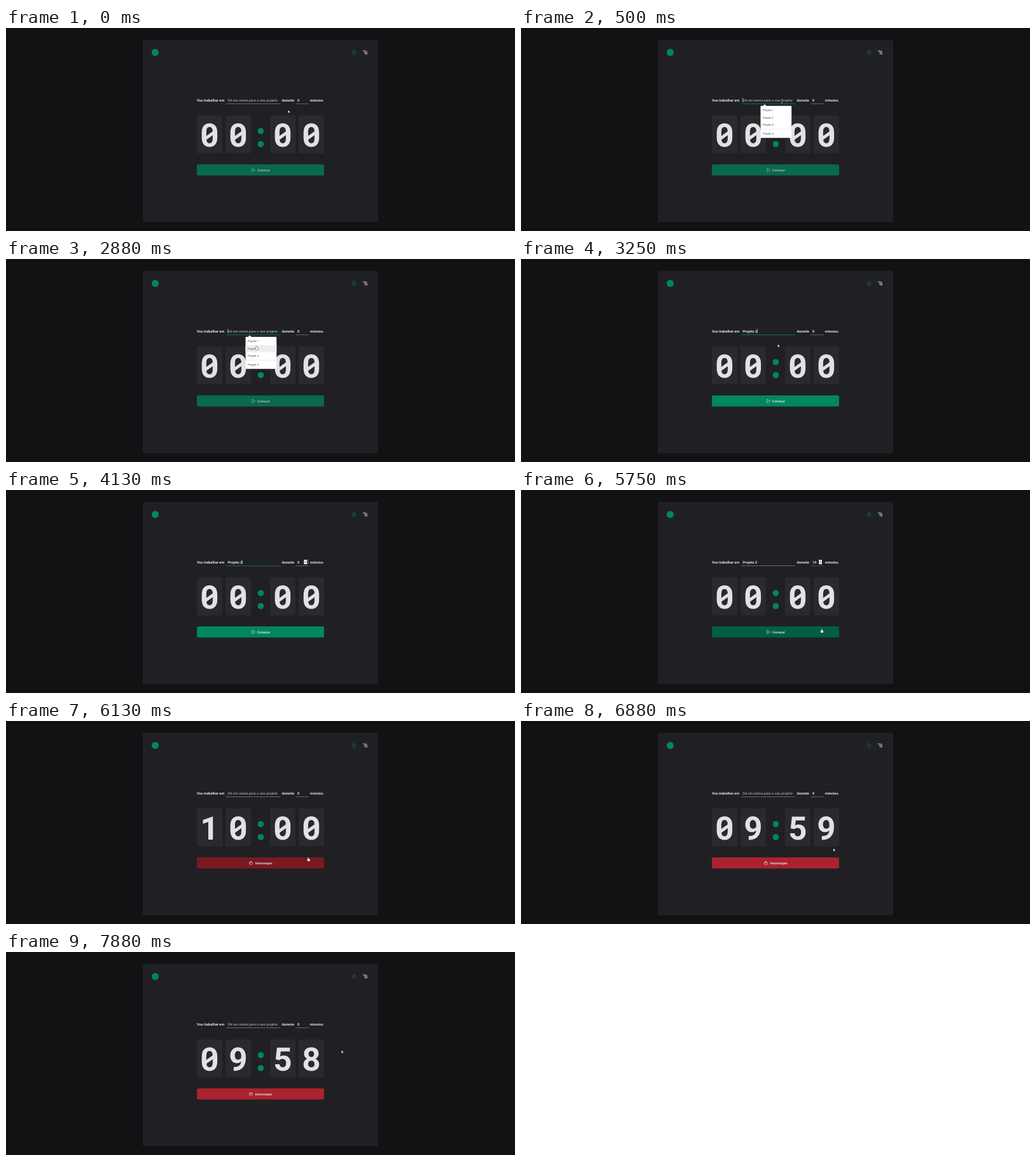
These frames come from a looping animation (800 by 320 pixels, 8 s). An HTML page with a canvas:

```html
<!DOCTYPE html>
<html lang="pt">
<head>
<meta charset="utf-8">
<title>Timer</title>
<style>
html, body { margin: 0; width: 100%; height: 100%; overflow: hidden; background: #121214; }
canvas { display: block; width: 800px; height: 320px; }
</style>
</head>
<body>
<canvas id="stage" width="800" height="320"></canvas>
<script>
const ctx = document.getElementById('stage').getContext('2d');
const LOOP = 8000, TICK = 125;
const GREEN = '#00875f', LIGHT = '#e1e1e6', GREY = '#8d8d99';

// Events, counted in ticks
const FOCUS = 4, PICK = 25, STEP_1 = 36, STEP_2 = 39, START = 47;

// Pointer path: tick, x, y
const path = [
  [0, 443.5, 129.5], [4, 410, 115.5], [18, 410, 115.5], [23, 393.5, 137.5],
  [25, 393.5, 137.5], [33, 474.5, 113], [35, 471, 112], [40, 471, 112],
  [43, 464, 212.5], [45, 472, 219], [47, 473, 219], [49, 475, 215],
  [51, 491, 201], [60, 491, 201], [63, 527.5, 155]
];

function pointerAt(k) {
  let i = 0;
  while (i < path.length - 2 && path[i + 1][0] <= k) i++;
  const [k0, x0, y0] = path[i], [k1, x1, y1] = path[i + 1];
  const p = Math.min(1, (k - k0) / (k1 - k0));
  return { x: x0 + (x1 - x0) * p, y: y0 + (y1 - y0) * p };
}

function rect(x, y, w, h, fill, r = 0) {
  ctx.fillStyle = fill;
  ctx.beginPath();
  ctx.roundRect(x, y, w, h, r);
  ctx.fill();
}

function dot(x, y, r, fill) {
  ctx.fillStyle = fill;
  ctx.beginPath();
  ctx.arc(x, y, r, 0, Math.PI * 2);
  ctx.fill();
}

function text(str, x, y, size, fill, weight = 700, align = 'left') {
  ctx.font = `${weight} ${size}px Roboto, sans-serif`;
  ctx.textRendering = 'geometricPrecision';
  ctx.textAlign = align;
  ctx.fillStyle = fill;
  ctx.fillText(str, x, y);
}

// Strokes and/or fills an SVG path placed at x, y
function shape(d, x, y, stroke, width, fill) {
  const p = new Path2D(d);
  ctx.save();
  ctx.translate(x, y);
  ctx.lineJoin = ctx.lineCap = 'round';
  if (stroke) {
    ctx.strokeStyle = stroke;
    ctx.lineWidth = width;
    ctx.stroke(p);
  }
  if (fill) {
    ctx.fillStyle = fill;
    ctx.fill(p);
  }
  ctx.restore();
}

function header() {
  dot(234.5, 38.5, 5.5, GREEN);
  shape('M2.7 .5A2.7 2.7 0 1 1-2.7 .5A2.7 2.7 0 1 1 2.7 .5M0 .5L1.2-.7M-.9-3.4H.9', 547, 38.5, GREEN, 0.6);
  shape('M-2.8-1.4A.9 .9 0 1 1-1.9-2.4H1.3Q2-2.4 2-1.6V1.5M-1.2-2V1.7Q-1.2 2.6-.3 2.6H2.4Q3.2 2.4 2.8 1.5H.2M-.1-.8H1.1M-.1 .4H1.1', 565, 38.5, LIGHT, 0.6);
}

function field(x, w, focused) {
  rect(x, 119.1, w, 0.7, focused ? GREEN : '#7c7c8a');
}

function form(s) {
  const base = 115.5, size = 5.625;
  text('Vou trabalhar em', 300, base, size, LIGHT);
  text('durante', 433.5, base, size, LIGHT);
  text('minutos.', 500, base, size, LIGHT, 700, 'right');
  field(346, 85, s.onName);
  field(455.5, 20, s.onMinutes);
  text(s.name || 'Dê um nome para o seu projeto', 348.5, base, size, s.name ? LIGHT : GREY);
  if (s.caret) rect(348.5 + (s.name ? ctx.measureText(s.name).width : 0), 110, 0.6, 7, LIGHT);
  text(s.minutes, 458, base, size, LIGHT);
  if (s.spinner) {
    rect(468.2, 110, 4.8, 7, '#f1f1f1');
    shape('M-1.1-.8L0-2.1L1.1-.8ZM-1.1 .8L0 2.1L1.1 .8Z', 470.6, 113.5, null, 0, '#333');
  }
}

function clock(digits) {
  [300, 345, 415, 460].forEach((x, i) => {
    rect(x, 137.7, 40, 60, '#29292e', 2.5);
    const cx = x + 20;
    text(digits[i], cx, 187.2, 51, LIGHT, 700, 'center');
    if (digits[i] === '0') {
      ctx.strokeStyle = LIGHT;
      ctx.lineWidth = 5;
      ctx.lineCap = 'butt';
      ctx.beginPath();
      ctx.moveTo(cx - 7, 174.5);
      ctx.lineTo(cx + 7, 164.5);
      ctx.stroke();
    }
  });
  dot(400.4, 162.5, 4.8, GREEN);
  dot(400.4, 183, 4.8, GREEN);
}

function button(s) {
  const box = fill => rect(300, 215, 200, 17.5, fill, 2.5);
  if (s.running) {
    box(s.hover ? '#7a1921' : '#ab222e');
    shape('M-2 .3V-1.3Q-1.4-2-.9-1.4V-.3V-2.2Q-.3-3 .3-2.2V-.4V-1.6Q.9-2.3 1.5-1.6V.1Q2.3-.7 2.6 0V.8Q2.3 3 .2 3Q-2.3 2.8-2.5 .9L-2.7-.6Q-2.5-1-2 .3', 385, 223.8, LIGHT, 0.55);
    text('Interromper', 391.8, 225.6, 5, LIGHT);
    return;
  }
  ctx.globalAlpha = s.name ? 1 : 0.7;
  box(s.hover && s.name ? '#015f43' : GREEN);
  shape('M-2.1-2.7L2.5 0L-2.1 2.7Z', 389.3, 223.8, LIGHT, 0.6);
  text('Começar', 394.9, 225.6, 5, LIGHT);
  ctx.globalAlpha = 1;
}

function popup(hoverRow) {
  shape('M-3 3L0 0L3 3Z', 383, 120.2, null, 0, '#fff');
  rect(376.5, 122.8, 48.7, 50.4, '#fff', 0.6);
  if (hoverRow) rect(376.5, 135.8, 48.7, 11, '#ededf0');
  rect(376.5, 159.3, 48.7, 0.5, '#ddd');
  [131.3, 142.6, 153.9, 168].forEach((y, i) =>
    text('Projeto ' + (i + 1), 380, y, 4.2, '#444', 400));
}

function pointer({ x, y }, kind) {
  if (kind === 'beam') {
    shape('M-.8-2.8H.8M0-2.8V2.8M-.8 2.8H.8', x, y, '#111', 1.2);
    shape('M-.8-2.8H.8M0-2.8V2.8M-.8 2.8H.8', x, y, '#ddd', 0.5);
  } else if (kind === 'hand') {
    shape('M-.6 3V.2Q0-.5 .6 .2V2.2L2.4 2.7Q2.9 3 2.8 3.7L2.2 6H-.6L-2 3.8Q-1.7 2.8-.6 3.8Z', x, y, '#222', 0.8, '#fff');
  } else {
    shape('M0 0V4.2L1 3.3L1.7 4.8L2.3 4.5L1.7 3.1H3Z', x, y, '#111', 0.6, '#fff');
  }
}

function digitsAt(k) {
  if (k < START) return '0000';
  const left = 600 - Math.floor((k - START) / 8);
  const pad = n => String(n).padStart(2, '0');
  return pad(Math.floor(left / 60)) + pad(left % 60);
}

function draw(ms) {
  const k = Math.floor((ms % LOOP) / TICK);
  const p = pointerAt(k);
  const open = k >= FOCUS && k < PICK;
  const running = k >= START;
  const onName = k >= FOCUS && k < STEP_1;
  const onMinutes = k >= STEP_1 && !running;
  const inRow = p.y > 107 && p.y < 120;
  const overMinutes = inRow && p.x > 455 && p.x < 476;
  const hover = p.y >= 215;
  const blink = (k - (open ? FOCUS : PICK)) % 8 < 4;
  const state = {
    running, hover, onName, onMinutes,
    name: k >= PICK && !running ? 'Projeto 2' : '',
    minutes: running || k < STEP_1 ? '0' : k < STEP_2 ? '5' : '10',
    caret: onName && blink,
    spinner: overMinutes || onMinutes
  };

  rect(0, 0, 800, 320, '#121214');
  rect(215, 18.8, 370, 287.4, '#202024', 2.5);
  header();
  form(state);
  clock(digitsAt(k));
  button(state);
  const overRow = open && p.y > 135.5;
  if (open) popup(overRow);

  const overName = inRow && p.x > 346 && p.x < 431;
  const beam = overName || (overMinutes && p.x > 473);
  pointer(p, beam ? 'beam' : hover || overRow ? 'hand' : 'arrow');
}

function frame() {
  draw(performance.now());
  requestAnimationFrame(frame);
}
frame();
</script>
</body>
</html>
```
